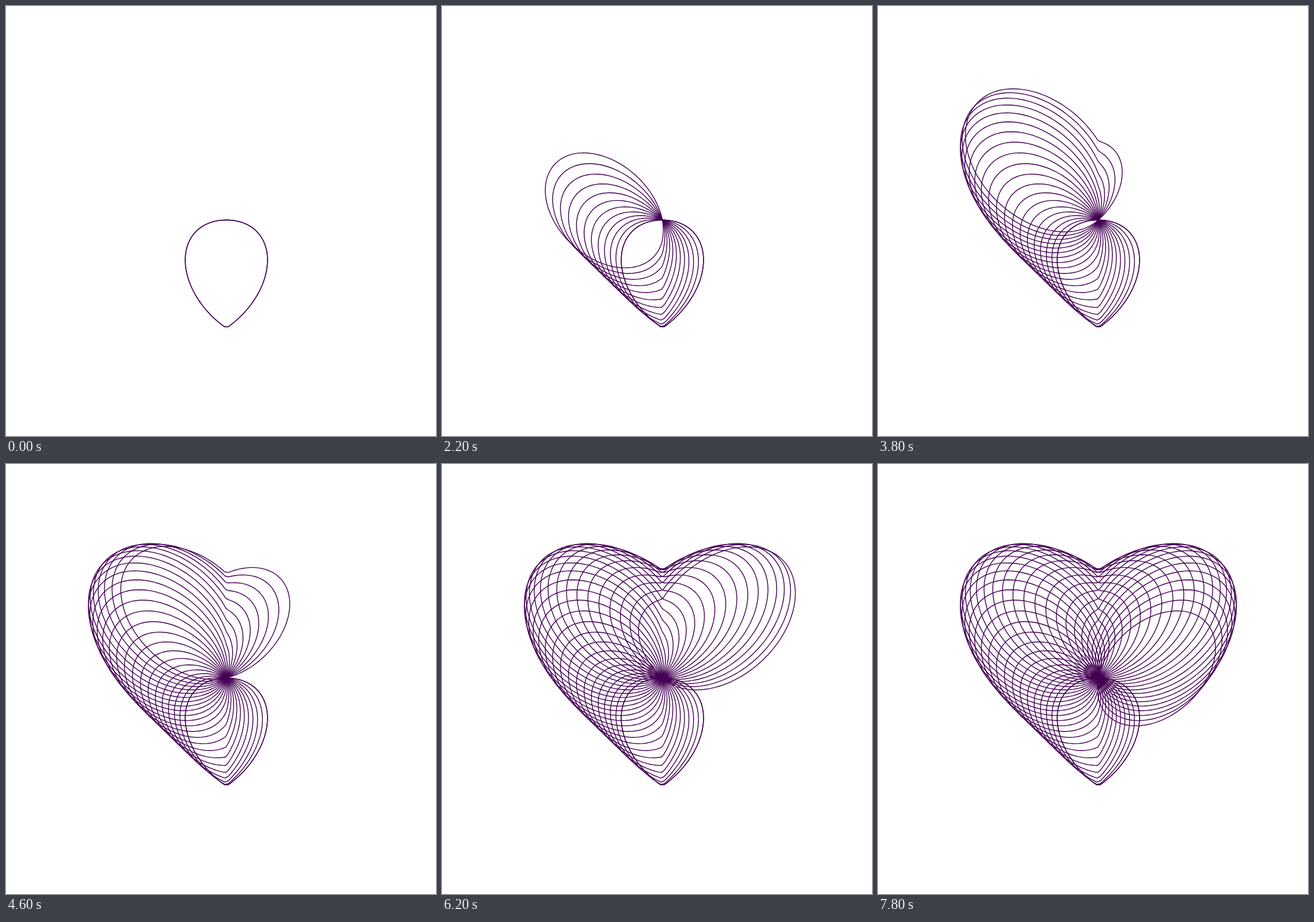
These frames come from a looping animation (720 px wide and 720 px high, 8 s). An HTML page with a canvas:

```html
<!DOCTYPE html>
<html lang="en">
<head>
<meta charset="utf-8">
<title>Heart envelope</title>
<style>
  html, body { margin: 0; height: 100%; overflow: hidden; background: #fff; }
  canvas { display: block; }
</style>
</head>
<body>
<canvas width="720" height="720"></canvas>
<script>
const ctx = document.querySelector("canvas").getContext("2d");
const LOOP = 8000, STEP = 200, TURN = 50, SAMPLES = 100;
const center = { x: 369, y: 358.3 };
const scale = { x: 186, y: 181 };

// Polar radius of the heart that the loops envelop.
const heart = a => 1 / (1 - 0.35 * 2 * Math.abs(Math.cos(a)) * Math.sin(a));

// A circle through the center, stretched by the heart's radius.
function drawLoop(index) {
  const heading = -Math.PI / 2 - index * 2 * Math.PI / TURN;
  ctx.beginPath();
  for (let i = 0; i < SAMPLES; i++) {
    const offset = Math.PI * (i / (SAMPLES - 1) - 0.5);
    const angle = heading + offset;
    const r = heart(angle) * Math.cos(offset);
    ctx.lineTo(center.x + scale.x * r * Math.cos(angle),
               center.y - scale.y * r * Math.sin(angle));
  }
  ctx.stroke();
}

function render(time) {
  const last = Math.floor((time % LOOP) / STEP);
  ctx.fillStyle = "#fff";
  ctx.fillRect(0, 0, 720, 720);
  ctx.strokeStyle = "#440154";
  ctx.lineWidth = 1.4;
  ctx.lineJoin = "round";
  drawLoop(0); // the first loop is doubled, so it looks heavier
  for (let i = 0; i <= last; i++) drawLoop(i);
}

let start;
function tick(now) {
  start ??= now;
  render(now - start);
  requestAnimationFrame(tick);
}
render(0);
requestAnimationFrame(tick);
</script>
</body>
</html>
```
